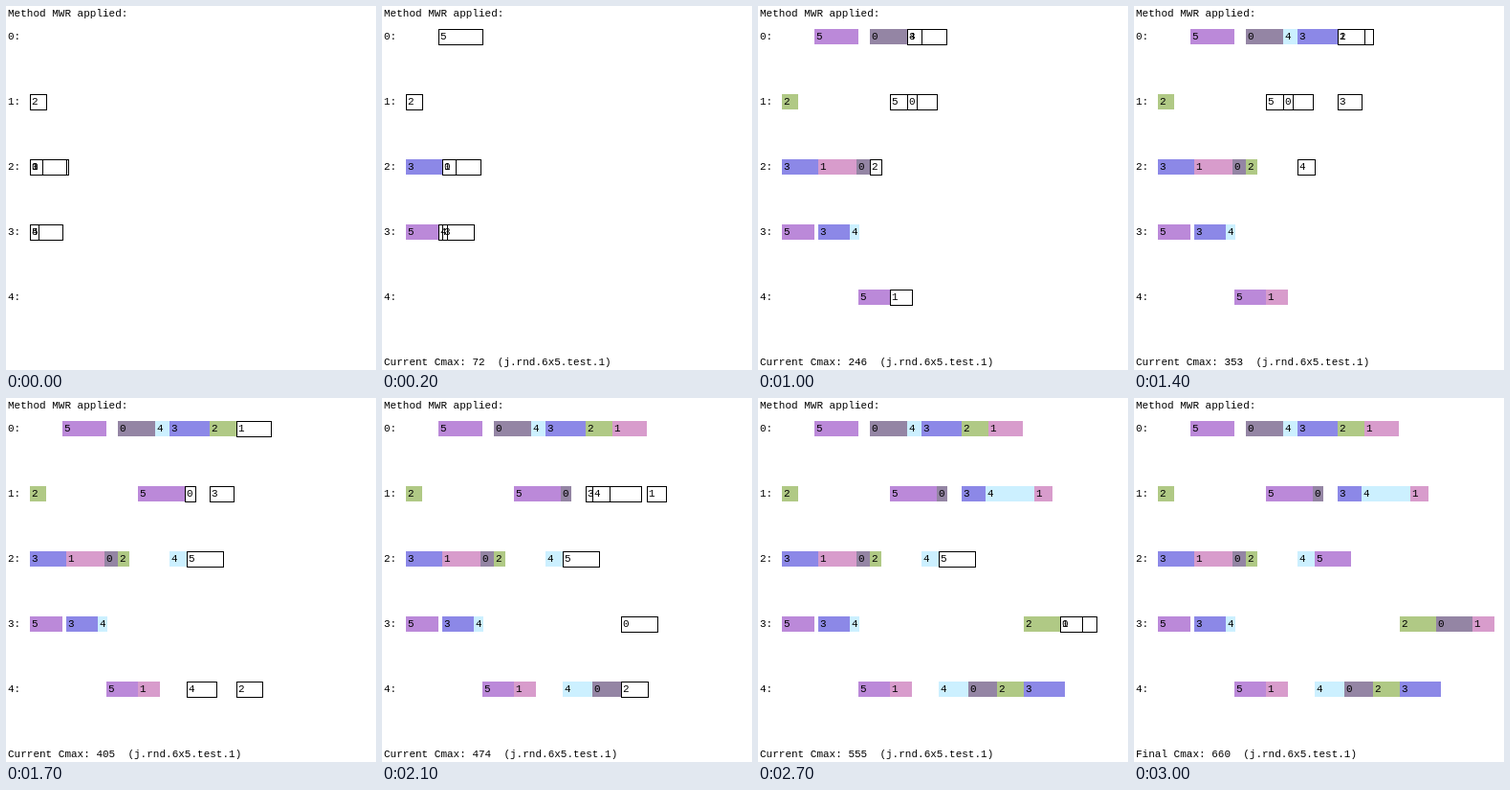
Animation, 387 px wide and 380 px high, one loop 3100 ms. Source, as an HTML page with a canvas:

```html
<!DOCTYPE html>
<html lang="en">
<head>
<meta charset="utf-8">
<title>Job shop schedule</title>
<style>
html, body { margin: 0; width: 100%; height: 100%; overflow: hidden; background: #fff; }
canvas { display: block; }
</style>
</head>
<body>
<canvas id="chart" width="387" height="380"></canvas>
<script>
const ctx = document.getElementById('chart').getContext('2d');
const STEP_MS = 100;
const SCALE = 8 / 15;

// A job visits one machine per route digit, for the given times
const job = (color, route, ...times) => ({
  color,
  ops: times.map((time, i) => ({ machine: +route[i], time }))
});
const jobs = [
  job('#9485a4', '20143', 26, 73, 20, 56, 71),
  job('#d89ccc', '24013', 75, 42, 69, 36, 42),
  job('#b0c985', '12043', 32, 22, 52, 52, 72),
  job('#8c88e7', '23014', 72, 62, 78, 47, 80),
  job('#ccf0ff', '30241', 18, 29, 33, 59, 95),
  job('#bb89d9', '30412', 64, 86, 63, 92, 71)
];
const machines = [...jobs[0].ops.keys()];
const total = jobs.length * machines.length;

// Most work remaining: always extend the job with the most time left
function schedule(count) {
  const queues = jobs.map(({ ops, color }, id) => ({
    id, color, ops: [...ops], free: 0,
    work: ops.reduce((sum, op) => sum + op.time, 0)
  }));
  const machineFree = machines.map(() => 0);

  const place = ({ id, color, ops: [op], free }) => {
    const start = Math.max(free, machineFree[op.machine]);
    return { id, color, machine: op.machine, start, end: start + op.time };
  };

  const done = [];
  while (done.length < count) {
    const queue = queues.reduce((best, q) => q.work > best.work ? q : best);
    const bar = place(queue);
    queue.work -= queue.ops.shift().time;
    queue.free = machineFree[bar.machine] = bar.end;
    done.push(bar);
  }
  return {
    done,
    waiting: queues.filter(q => q.ops.length).map(place),
    cmax: Math.max(...machineFree)
  };
}

const toX = time => 25 + Math.floor(time * SCALE + 1e-6);
const rowY = machine => 24 + 68 * machine;

function text(str, x, y) {
  ctx.fillStyle = '#000';
  ctx.fillText(str, x, y);
}

function drawBar({ id, color, machine, start, end }, filled) {
  const x = toX(start), y = rowY(machine), w = toX(end) - x;
  if (filled) {
    ctx.fillStyle = color;
    ctx.fillRect(x, y, w, 16);
  } else {
    ctx.strokeRect(x + 0.5, y + 0.5, w, 16);
  }
  text(id, x + 2, y + 11);
}

function draw(step) {
  const { done, waiting, cmax } = schedule(step);
  ctx.clearRect(0, 0, 387, 380);
  ctx.font = '11px "Courier New", "Liberation Mono", monospace';

  text('Method MWR applied:', 2, 11);
  machines.forEach(m => text(m + ':', 2, rowY(m) + 11));
  done.forEach(bar => drawBar(bar, true));
  waiting.forEach(bar => drawBar(bar, false));
  if (step) {
    const label = step === total ? 'Final' : 'Current';
    text(`${label} Cmax: ${cmax}  (j.rnd.6x5.test.1)`, 2, 375);
  }
}

let shown = -1;
function tick() {
  const step = Math.floor(performance.now() / STEP_MS) % (total + 1);
  if (step !== shown) draw(shown = step);
  requestAnimationFrame(tick);
}
tick();
</script>
</body>
</html>
```
